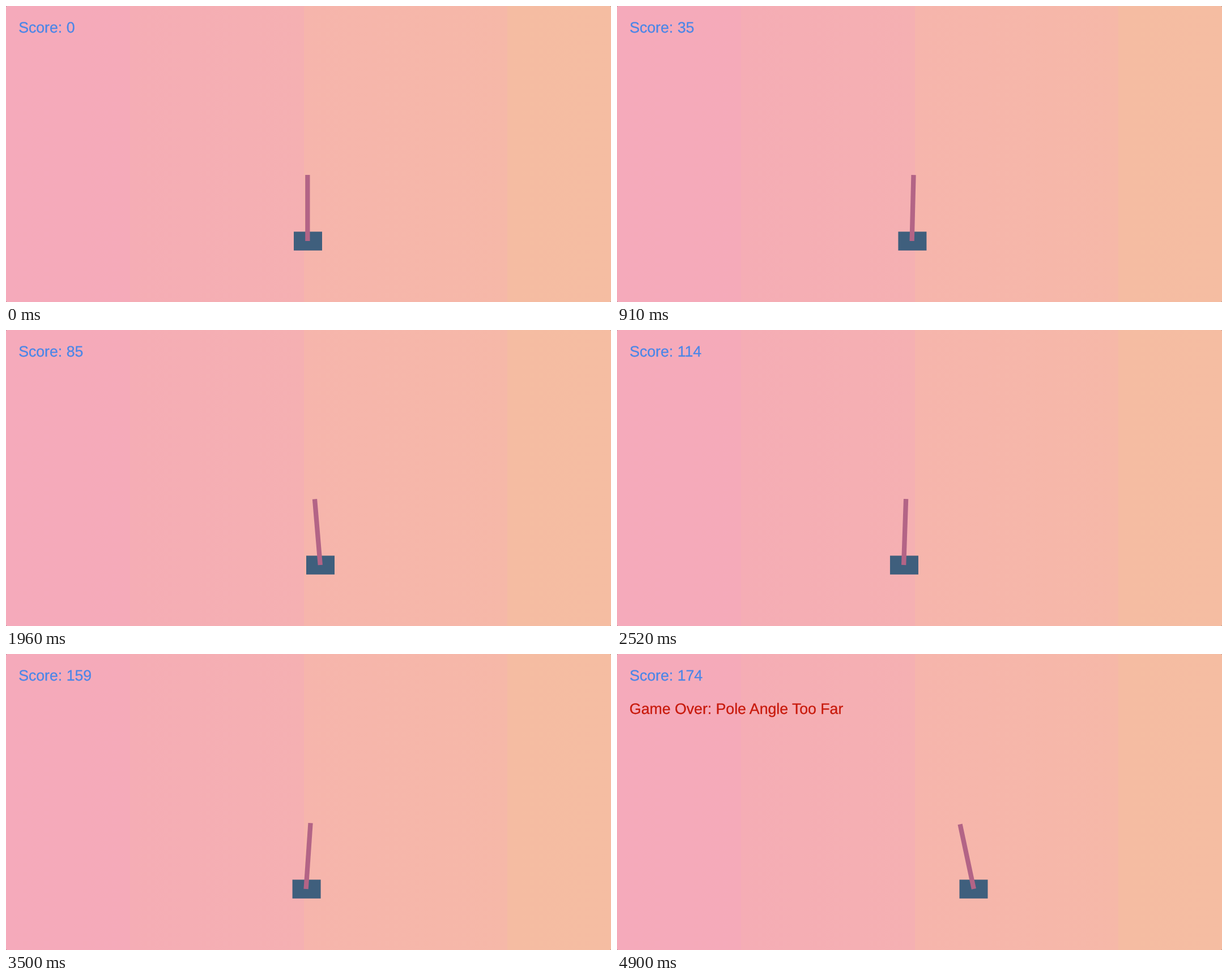
Animation, 1068 px wide and 524 px high, one loop 4970 ms. Source, as an HTML page:

```html
<!DOCTYPE html>
<html lang="en">
<head>
<meta charset="utf-8">
<title>Balance the pole</title>
<style>
  html, body { margin: 0; width: 100%; height: 100%; overflow: hidden; background: #8d7f80; }
  svg {
    display: block; width: 1068px; height: 524px; border-radius: 2px;
    background: linear-gradient(to right,
      #f5aabb 0, #f5aab9 219px, #f5adb5 219px, #f5b0b2 526px,
      #f6b5ac 526px, #f6b8a8 885px, #f5bca2 885px, #f5bda2 1068px);
  }
  text {
    font: 26.67px "Liberation Sans", Arial, sans-serif;
    text-rendering: geometricPrecision; stroke-width: .3px;
  }
  #score { fill: #4a86e8; stroke: #4a86e8; }
  #over { fill: #c8190b; stroke: #c8190b; }
</style>
</head>
<body>
<svg viewBox="0 0 1068 524">
  <text id="score" x="22.2" y="47.3">Score: 0</text>
  <text id="over" x="22" y="105.8" visibility="hidden">Game Over: Pole Angle Too Far</text>
  <g id="cart">
    <rect y="399.5" width="50" height="33.3" fill="#3f5f7d"/>
    <rect id="pole" x="20.2" y="299" width="8.3" height="117" fill="#b36486"/>
  </g>
</svg>
<script>
const LOOP = 4970, STEP = 70, END = 3850;

// Turning points of the ride
const poses = [
  { t: 0, x: 508, angle: 0, score: 0 },
  { t: 420, x: 498, angle: 0, score: 14 },
  { t: 1330, x: 500.7, angle: 1.6, score: 53 },
  { t: 1680, x: 524, angle: -4, score: 73 },
  { t: 1960, x: 530, angle: -4.8, score: 85 },
  { t: 2310, x: 509, angle: -2.5, score: 103 },
  { t: 2940, x: 438, angle: 10.1, score: 135 },
  { t: 3500, x: 505.6, angle: 3.9, score: 159 },
  { t: 3640, x: 530, angle: 5, score: 165 },
  { t: END, x: 604.5, angle: -12, score: 174 }
];

const slope = (a, b, key) => (b[key] - a[key]) / (b.t - a.t);
const mix = (a, b, u) => a + (b - a) * u;

// Cubic curve whose tangent at each pose follows its neighbours
function glide(i, key, u) {
  const a = poses[i], b = poses[i + 1], v = 1 - u;
  const leave = slope(poses[i - 1] || a, b, key);
  const arrive = slope(a, poses[i + 2] || b, key);
  return mix(a[key], b[key], u * u * (3 - 2 * u))
    + (b.t - a.t) * u * v * (v * leave - u * arrive);
}

const [score, over, cart, pole] =
  ["score", "over", "cart", "pole"].map(id => document.getElementById(id));

function draw(time) {
  const tick = Math.floor(time % LOOP / STEP) * STEP;
  const t = Math.min(tick, END);
  const i = poses.findIndex(p => p.t >= t && p.t > 0) - 1;
  const a = poses[i], b = poses[i + 1];
  const u = (t - a.t) / (b.t - a.t);

  cart.setAttribute("transform", `translate(${glide(i, "x", u)} 0)`);
  pole.setAttribute("transform", `rotate(${glide(i, "angle", u)} 24.35 411)`);
  score.textContent = "Score: " + Math.round(mix(a.score, b.score, u));
  over.setAttribute("visibility", tick >= END ? "visible" : "hidden");
}

const start = performance.now();
function frame() {
  draw(performance.now() - start);
  requestAnimationFrame(frame);
}
frame();
</script>
</body>
</html>
```
